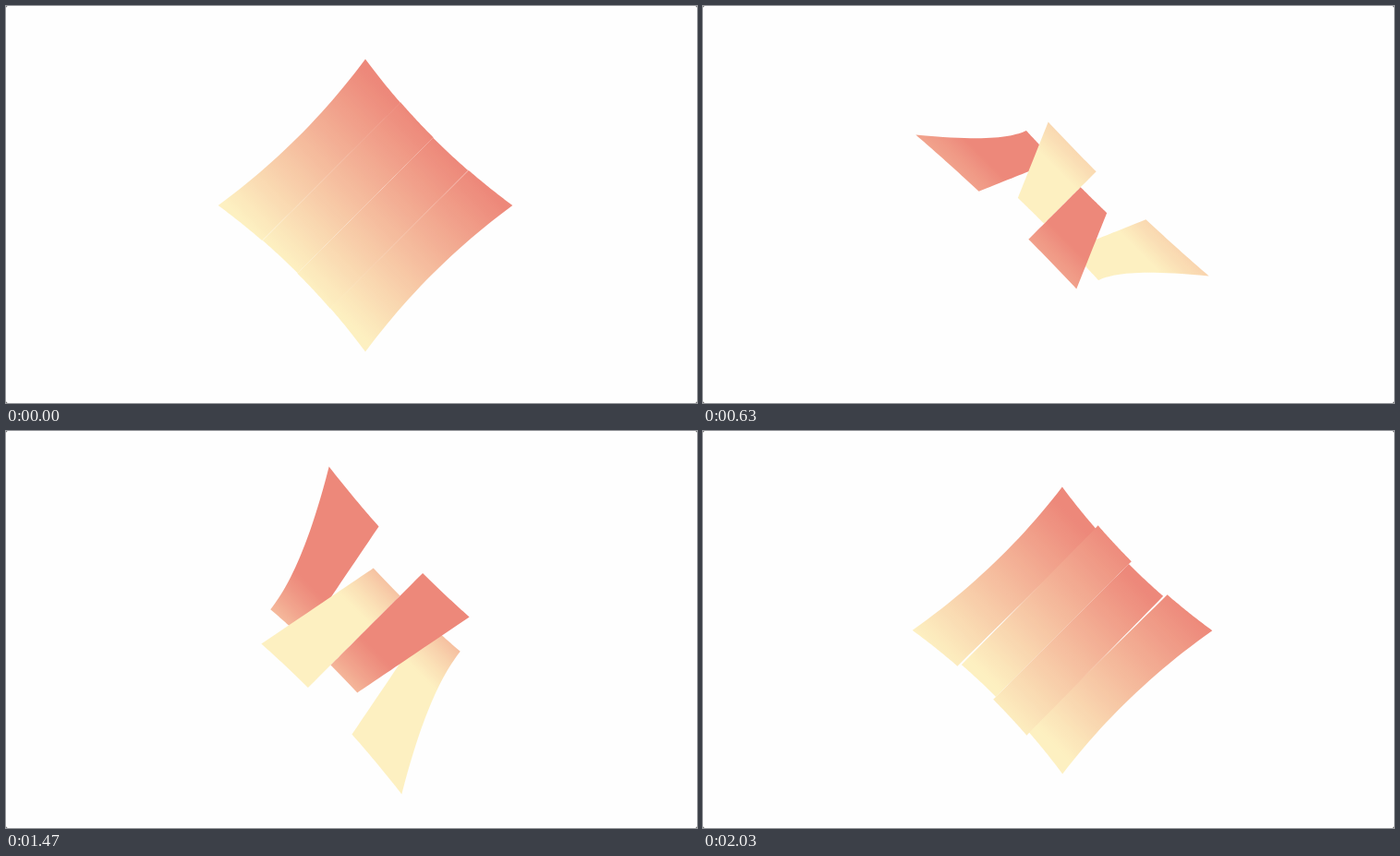
An HTML page with a canvas for the animation above (2100 ms loop, 748 by 430 pixels).

```html
<!DOCTYPE html>
<html lang="en">
<head>
<meta charset="utf-8">
<title>Turning strips</title>
<style>
  html, body { margin: 0; width: 100%; height: 100%; overflow: hidden; background: #333; }
  canvas { display: block; background: #fefefe; border-radius: 2px; }
</style>
</head>
<body>
<canvas id="stage" width="748" height="430"></canvas>
<script>
const ctx = document.getElementById('stage').getContext('2d');

const STEP = 70, STEPS = 15;          // one half turn
const CENTER = [389, 216];
const CORNER = 112.4, WAIST = 103.9;  // half sizes of the cushion shape
const DEPTH = 325;                    // perspective distance
const YELLOW = [253, 240, 193], RED = [237, 136, 122];

// Outer strips first: the inner ones always pass in front of them.
const strips = [
  { from: -CORNER, to: -WAIST / 2, dir: 1 },
  { from: WAIST / 2, to: CORNER, dir: -1 },
  { from: -WAIST / 2, to: 0, dir: -1 },
  { from: 0, to: WAIST / 2, dir: 1 }
];

const clamp = n => Math.max(0, Math.min(1, n));
const edge = n => WAIST + (CORNER - WAIST) * (n / CORNER) ** 2;

// cubic-bezier(.42, 0, .58, 1)
function easeInOut(t) {
  let low = 0, high = 1, s = 0.5;
  for (let i = 0; i < 24; i++) {
    const r = 1 - s;
    if (1.26 * s * r * r + 1.74 * s * s * r + s ** 3 < t) low = s; else high = s;
    s = (low + high) / 2;
  }
  return s * s * (3 - 2 * s);
}

function outline({ from, to }) {
  const points = [], n = 24;
  const row = (v, u) => Math.abs(v) === CORNER ? Math.sign(v) * edge(u) : v;
  const side = (sign, a, b) => {
    for (let i = 0; i <= n; i++) {
      const v = a + (b - a) * i / n;
      points.push([sign * edge(v), v]);
    }
  };
  const across = (v, sign) => {
    for (let i = 1; i < n; i++) {
      const u = sign * edge(v) * (1 - 2 * i / n);
      points.push([u, row(v, u)]);
    }
  };
  side(1, from, to);
  across(to, 1);
  side(-1, to, from);
  across(from, -1);
  return points;
}
strips.forEach(strip => strip.points = outline(strip));

// Odd strips slide through red, the others through yellow.
function shade(u, dir, progress) {
  const x = (u + WAIST) / (2 * WAIST) + dir * 2 * progress;
  const k = clamp(dir > 0 ? 1.5 - Math.abs(x - 1.5) : Math.abs(x + 0.5) - 0.5);
  return `rgb(${YELLOW.map((c, i) => Math.round(c + (RED[i] - c) * k))})`;
}

function drawStrip({ points, dir }, progress) {
  const cos = Math.cos(Math.PI * progress), sin = Math.sin(Math.PI * progress);
  if (Math.abs(cos) < 0.005) return;  // edge-on
  const project = (u, v) => {
    const scale = DEPTH / (DEPTH - dir * u * sin);
    return [u * cos * scale, v * scale];
  };
  const start = project(-CORNER, 0)[0], end = project(CORNER, 0)[0];
  const fill = ctx.createLinearGradient(start, 0, end, 0);
  for (let i = 0; i <= 60; i++) {
    const u = CORNER * (i / 30 - 1);
    fill.addColorStop(clamp((project(u, 0)[0] - start) / (end - start)), shade(u, dir, progress));
  }
  ctx.beginPath();
  points.forEach(([u, v]) => ctx.lineTo(...project(u, v)));
  ctx.closePath();
  ctx.fillStyle = fill;
  ctx.fill();
}

function draw(now) {
  const step = Math.floor((now + 1) / STEP) % STEPS;
  const progress = easeInOut((step + STEPS - 0.5) / STEPS % 1);
  ctx.resetTransform();
  ctx.clearRect(0, 0, 748, 430);
  ctx.translate(...CENTER);
  ctx.rotate(-Math.PI / 4);
  strips.forEach(strip => drawStrip(strip, progress));
  requestAnimationFrame(draw);
}
draw(0);
</script>
</body>
</html>
```
